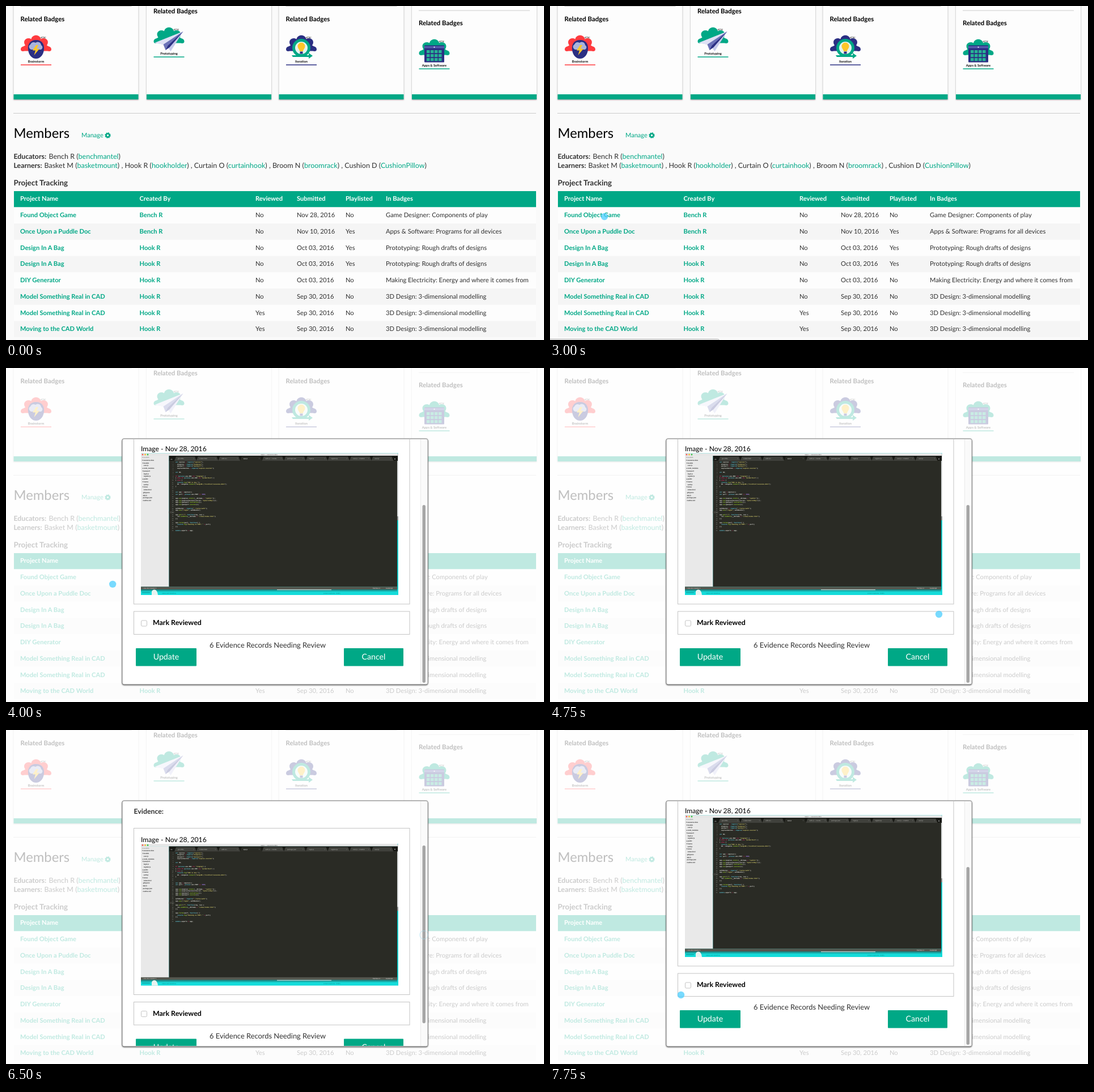
An HTML page for the animation above (8 s loop, 949 px wide and 590 px high).

```html
<!DOCTYPE html>
<html lang="en">
<head>
<meta charset="utf-8">
<title>Project review</title>
<style>
html, body { margin: 0; width: 100%; height: 100%; overflow: hidden; background: #fafafa; }
svg { display: block; width: 949px; height: 590px; font-family: Lato, "Open Sans", sans-serif; text-rendering: geometricPrecision; }
text { white-space: pre; }
.b { font-weight: 700; }
.code text { font-family: "DejaVu Sans Mono", monospace; }
.card { filter: drop-shadow(0 1px 1px rgba(0,0,0,.38)); }
.frame { filter: drop-shadow(.7px 1px .8px rgba(0,0,0,.6)); }
</style>
</head>
<body>
<svg id="stage" viewBox="0 0 949 590" xmlns="http://www.w3.org/2000/svg"></svg>
<script>
const GREEN = '#00a886', NAVY = '#2b2f83', INK = '#303030';
const esc = s => String(s).replace(/&/g, '&amp;').replace(/</g, '&lt;');
const rect = (x, y, w, h, fill, more = '') =>
  `<rect x="${x}" y="${y}" width="${w}" height="${h}" fill="${fill}" ${more}/>`;
const text = (x, y, s, size, fill = INK, more = '') =>
  `<text x="${x}" y="${y}" font-size="${size}" fill="${fill}" ${more}>${esc(s)}</text>`;
const bold = (x, y, s, size, fill, more = '') => text(x, y, s, size, fill, 'class="b" ' + more);
const line = (x1, x2, y, c, w = 1) => `<path d="M${x1} ${y}H${x2}" stroke="${c}" stroke-width="${w}"/>`;
const circle = (x, y, r, fill, more = '') => `<circle cx="${x}" cy="${y}" r="${r}" fill="${fill}" ${more}/>`;
const path = (d, fill, more = '') => `<path d="${d}" fill="${fill}" ${more}/>`;
const range = n => [...Array(n).keys()];

// ---- badges ----
const FLOWER = 'M0 26C0 20 5 21 8 18.500C2 10 11 3 18.500 7.500C20-1.500 34-1.500 35.500 7.500C43 3 52 10 46 18.500C49 21 54 20 54 26Q53.500 30 47 28.500H7Q.5 30 0 26Z';
const icons = {
  Brainstorm: path('M27 9C38 9 42 17 41 26C40 36 34 42 27 42C20 42 14 36 13 26C12 17 16 9 27 9Z', NAVY) +
    path('M18 26a5 5 0 0 1-1-9a6 6 0 0 1 9-3a6 6 0 0 1 10 4a4.500 4.500 0 0 1 0 8Z', '#aab4dc') +
    path('M27 18L21 27.500H26L23.500 36L33 24.500H28L31 18Z', '#ffc629'),
  Prototyping: path('M2 28L52 8L30 43L22 32Z', '#c6c9ea') +
    path('M2 28L52 8L17 31Z', '#dfe1f5') + path('M17 31L52 8L21 41Z', '#6d73b8') +
    path('M21 41L25 33L52 8L28 36Z', NAVY),
  Iteration: circle(27, 23, 13.500, '#e4f3f0', `stroke="${GREEN}" stroke-width="5"`) +
    path('M10 36H40V32L47 37L40 42V39H12Z', GREEN) +
    path('M24 29C24 26 20.500 24 20.500 20a6.500 6.500 0 0 1 13 0C33.500 24 30 26 30 29Z', '#ffc629') +
    rect(24.500, 29.500, 5, 4, NAVY),
  'Apps & Software': rect(9.500, 11.500, 35, 30, NAVY, 'rx="1"') + rect(9.500, 13, 35, 3.500, '#555cab') +
    circle(27, 14.700, 1, '#fff') +
    range(12).map(i => rect(13.500 + i % 4 * 7, 20 + (i / 4 | 0) * 7, 5.500, 5.200, '#26b394')).join('')
};
const badge = (x, y, name, petal, rule) => `<g transform="translate(${x} ${y})">` +
  path(FLOWER, petal) + text(35, 5.500, 'ATTIC', 3.400, '#111', 'class="b"') + icons[name] +
  bold(27, 49, name, 5.800, '#111', 'text-anchor="middle"') + line(0, 54, 53, rule, 1.400) + '</g>';

const card = (x, titleY, ruleY) =>
  `<g class="card">${rect(x, -20, 220, 185, '#fdfdfd')}${rect(x, 156, 220, 9, GREEN)}</g>` +
  (ruleY ? line(x + 12, x + 208, ruleY, '#ccc') : '') + bold(x + 12, titleY, 'Related Badges', 11.400, '#000');

// ---- page ----
const person = ([who, user]) => `${who} (<tspan fill="${GREEN}">${user}</tspan>)`;
const people = (x, y, list) =>
  `<text x="${x}" y="${y}" font-size="12.5" fill="${INK}">${list.map(person).join(' , ')}</text>`;

const COLS = [25, 235.500, 440, 513, 599, 670];
const R = 'Bench R', H = 'Hook R';
const MODEL = 'Model Something Real in CAD', ROUGH = 'Prototyping: Rough drafts of designs', SHAPE = '3D Design: 3-dimensional modelling';
const ROWS = [
  ['Found Object Game', R, 'No', 'Nov 28, 2016', 'No', 'Game Designer: Components of play'],
  ['Once Upon a Puddle Doc', R, 'No', 'Nov 10, 2016', 'Yes', 'Apps & Software: Programs for all devices'],
  ['Design In A Bag', H, 'No', 'Oct 03, 2016', 'Yes', ROUGH],
  ['Design In A Bag', H, 'No', 'Oct 03, 2016', 'Yes', ROUGH],
  ['DIY Generator', H, 'No', 'Oct 03, 2016', 'No', 'Making Electricity: Energy and where it comes from'],
  [MODEL, H, 'No', 'Sep 30, 2016', 'No', SHAPE],
  [MODEL, H, 'Yes', 'Sep 30, 2016', 'No', SHAPE],
  ['Moving to the CAD World', H, 'Yes', 'Sep 30, 2016', 'No', SHAPE]
];
const PITCH = 28.72;

function table() {
  let s = rect(14, 327, 921, 28.500, GREEN);
  ['Project Name', 'Created By', 'Reviewed', 'Submitted', 'Playlisted', 'In Badges']
    .forEach((h, i) => s += bold(COLS[i], 344.300, h, 11.100, '#fff'));
  ROWS.forEach((row, r) => {
    s += rect(14, 355.500 + r * PITCH, 921, PITCH, r % 2 ? '#f5f5f5' : '#fdfdfd');
    row.forEach((c, i) => {
      const y = 373.300 + r * PITCH;
      s += i < 2 ? bold(COLS[i], y, c, 11.150, GREEN) : text(COLS[i], y, c, 11.200);
    });
  });
  return s;
}

const gear = circle(179.500, 228.500, 3, 'none', `stroke="${GREEN}" stroke-width="2.6"`) +
  circle(179.500, 228.500, 4.300, 'none', `stroke="${GREEN}" stroke-width="1.8" stroke-dasharray="1.9 1.477"`);

const page = rect(0, 0, 949, 590, '#fafafa') +
  card(13.500, 27.300, .5) + card(248, 13) + card(481.500, 27.300, .5) + card(716, 34.300, 8) +
  badge(26, 51, 'Brainstorm', '#ff3b3f', '#ff3b3f') +
  badge(260.500, 37, 'Prototyping', GREEN, GREEN) +
  badge(494, 51, 'Iteration', NAVY, NAVY) +
  badge(728.500, 58, 'Apps & Software', GREEN, GREEN) +
  line(13, 935, 189.500, '#cbcbcb') +
  text(13.500, 232.500, 'Members', 23.800, '#000') + text(133, 232.300, 'Manage', 11.100, GREEN) + gear +
  bold(13.500, 269.500, 'Educators:', 12.300, INK) + people(75.500, 269.500, [[R, 'benchmantel']]) +
  bold(13.500, 286, 'Learners:', 12.300, INK) +
  people(67.500, 286, [['Basket M', 'basketmount'], [H, 'hookholder'], ['Curtain O', 'curtainhook'],
    ['Broom N', 'broomrack'], ['Cushion D', 'CushionPillow']]) +
  bold(13.500, 317, 'Project Tracking', 13.400, INK) + table();

// ---- code editor picture ----
const CODE = `var express = require("express"),
  mongoose = require("mongoose"),
  passport = require("passport"),
  expressSession = require("express-session");

var db;

if (process.env.ENV === "staging") {
} else if (process.env.ENV === "production") {
} else {
  console.log("ENV is dev.");
  db = mongoose.connect("mongodb://localhost/assessme-data");
}


var app = express();
var port = process.env.PORT || 3000;

app.use(express.static(__dirname + "/public"));
app.use(expressSession({secret: "mySecretKey"}));
app.use(passport.initialize());
app.use(passport.session());

authRouter = require("./routes/auth");
app.use("/login", authRouter);

app.get("/*", function(req, res) {
  res.sendFile(__dirname + "/views/index.html");
});

app.listen(port, function() {
  console.log("Running on PORT: " + port);
});

module.exports = app;`.split('\n');
const TOKEN = /("[^"]*")|(\b(?:var|function|console|require|process|module)\b)|(===|\|\||[=+]|\b(?:if|else)\b)|(\b\d+\b)|(\.\w+(?=\())/g;
const HUES = ['#e6db74', '#66d9ef', '#f92672', '#ae81ff', '#a6e22e'];
const paint = s => s.replace(TOKEN, (m, ...g) => `<tspan fill="${HUES[g.findIndex(v => v)]}">${m}</tspan>`);

const FILES = ['FOLDERS', '▾ assessme-data', ' ▾ models', '    user.js', ' ▸ node_modules', ' ▾ passport', '    login.js',
  '    register.js', ' ▸ public', ' ▾ routes', '    auth.js', ' ▾ views', '    index.html', '  .gitignore', '  app.js', '  package.json', '  readme.md'];
const TABS = ['gruntfile', 'index.html', 'edit.css', 'app.js', 'auth.js — routes', 'package.json', 'login.js', 'register.js', 'user.js — models', 'user.js'];

function editor() {
  let s = rect(238, 150.500, 454, 250.500, '#14dcda') + rect(690, 151, 2, 112, '#d5d8d8') + rect(690, 262, 2, 7, '#8a8f8f') +
    rect(689.500, 269, 1, 122, '#178f8d') +
    rect(238, 150.500, 452, 4.800, '#e6e6e6') +
    ['#f25f57', '#f7b92d', '#39c24a'].map((c, i) => circle(241 + i * 4.500, 153, 1.400, c)).join('') +
    text(464, 154, 'app.js — assessme-data', 2.900, '#555', 'text-anchor="middle"') +
    rect(238, 155, 49.500, 231.500, '#e9e9e9') + rect(287.500, 155, 403.500, 9, '#171814') +
    rect(287.500, 163.500, 402.500, 223, '#2a2b25') + rect(287.500, 253.200, 9, 3.400, '#3d3e38') +
    rect(238, 386.300, 452, 4.900, '#55574f') + text(241, 389.900, '▫ Line 26, Column 1', 2.800, '#eee') +
    text(647, 389.900, 'Tab Size: 2', 2.800, '#eee') + text(670, 389.900, 'JavaScript', 2.800, '#eee') +
    `<linearGradient id="shade" x2="0" y2="1"><stop stop-color="#1d7573"/><stop offset="1" stop-color="#14dcda"/></linearGradient>` +
    rect(238, 391, 452, 5, 'url(#shade)') + rect(478, 391.200, 96, 1, '#dfe8e8') +
    path('M257 401V395Q258 391.500 262 391.500Q267 392 268 401Z', '#e9f3f0') +
    text(275, 398.500, 'notes and sketches', 3, '#0b8f90') + text(560, 398.500, 'screen captures  drafts', 3, '#0b8f90') +
    rect(240, 396, 14, 1.500, '#0fa9a9');
  TABS.forEach((t, i) => {
    const x = 297 + i * 38.600, on = i === 3;
    s += path(`M${x} 164L${x + 3} 156.500H${x + 36}L${x + 39} 164Z`, on ? '#2a2b25' : '#40413c') +
      text(x + 6, 161.200, t, 2.900, on ? '#fff' : '#b9b9b4') + text(x + 33, 161.200, '×', 3, '#999');
  });
  s += text(290, 161.500, '◂ ▸', 3, '#ccc') + text(685, 161.500, '▾', 4, '#ddd');
  FILES.forEach((f, i) => s += text(240, 159 + i * 4.750, f, 2.900, i ? '#222' : '#777', i ? 'class="b"' : ''));
  s += '<g class="code">';
  CODE.forEach((c, i) => {
    const y = 167 + i * 3.560;
    s += text(295.500, y, i + 1, 2.300, '#8f908a', 'text-anchor="end"') +
      `<text x="299" y="${y}" font-size="2.48" font-weight="700" fill="#f8f8f2">${paint(c)}</text>`;
  });
  return s + '</g>';
}

// ---- dialog ----
const box = (y, h) => rect(225.500, y, 486.500, h, 'none', 'stroke="#c4c4c4"');
const button = (x, w, label) => rect(x, 495, w, 31.500, GREEN, 'rx="1"') +
  text(x + w / 2, 514.500, label, 14.200, '#fff', 'text-anchor="middle"');

const dialog = rect(205, 125, 539, 434, '#fff', 'rx="3" stroke="#7c7c7c" class="frame"') +
  `<clipPath id="view">${rect(206, 125.500, 525, 432.500, '#000')}</clipPath><g clip-path="url(#view)"><g id="content">` +
  bold(225.500, 97.500, 'Evidence:', 12.300, INK) + box(123, 294) +
  text(238, 147, 'Image - Nov 28, 2016', 12.150, '#000') + editor() +
  box(430, 40.500) + rect(238.500, 446, 10, 10, '#fff', 'rx="2" stroke="#c4c4c4"') +
  bold(259, 454.300, 'Mark Reviewed', 12.400, '#000') +
  text(461.500, 494.200, '6 Evidence Records Needing Review', 12.900, INK, 'text-anchor="middle"') +
  button(229, 107, 'Update') + button(596, 105, 'Cancel') + '</g></g>' +
  rect(731, 126, 12.300, 432, '#fafafa') + rect(731, 126, 1, 432, '#e8e8e8') +
  rect(734.500, 242, 5.500, 314, '#a6a6a6', 'rx="2.7" id="thumb"');

const stage = document.getElementById('stage');
stage.innerHTML = page +
  rect(0, 0, 949, 590, '#fff', 'id="veil"') +
  rect(-5, 588.300, 303.500, 20, '#f0f0f0', 'rx="3" stroke="#b4b4b4" id="status"') +
  `<g id="dialog">${dialog}</g>` +
  circle(0, 0, 6.200, '#4bcdfd', 'fill-opacity=".75" id="dot"') +
  circle(0, 0, 7.300, 'none', 'stroke="#9fdcf0" stroke-opacity=".6" id="ring"');

// ---- motion ----
const SCROLL = [[5250, 0], [6500, 50.5], [7250, 0]];
const POINTER = [
  [500, 172, 331], [1250, 69, 376], [1750, 99, 380], [2000, 99, 380], [2750, 94, 390], [3000, 96, 372],
  [3750, 96, 372], [4750, 686, 435], [5250, 737, 400], [7250, 737, 400], [7750, 231, 468]
];
const smooth = k => k * k * (3 - 2 * k);
function at(keys, t) {
  if (t <= keys[0][0]) return keys[0].slice(1);
  const i = keys.findIndex(k => k[0] > t);
  if (i < 0) return keys[keys.length - 1].slice(1);
  const a = keys[i - 1], b = keys[i], k = smooth((t - a[0]) / (b[0] - a[0]));
  return a.slice(1).map((v, j) => v + (b[j + 1] - v) * k);
}
const $ = id => document.getElementById(id);
const fade = (id, v) => $(id).setAttribute('opacity', v);
const move = (id, x, y) => $(id).setAttribute('transform', `translate(${x} ${y})`);

function draw(now) {
  const t = Math.floor(now % 8000 / 250) * 250; // four steps a second
  const [scroll] = at(SCROLL, t), [x, y] = at(POINTER, t), slide = -scroll * .753;
  const open = t >= 3750 ? 2 : t >= 3500 ? 1 : 0;
  const drag = t >= 5500 && t < 7250;
  const ring = drag || (t >= 1750 && t < 2250);
  fade('veil', [0, .68, .75][open]);
  fade('dialog', [0, .92, 1][open]);
  fade('status', t >= 2250 && t < 3750 ? 1 : 0);
  move('content', 0, scroll);
  move('thumb', 0, slide);
  for (const id of ['dot', 'ring']) move(id, x, y + slide);
  fade('dot', t >= 500 && !ring ? 1 : 0);
  fade('ring', ring ? 1 : 0);
}
const start = performance.now();
function tick() {
  draw(performance.now() - start);
  requestAnimationFrame(tick);
}
tick();
</script>
</body>
</html>
```
